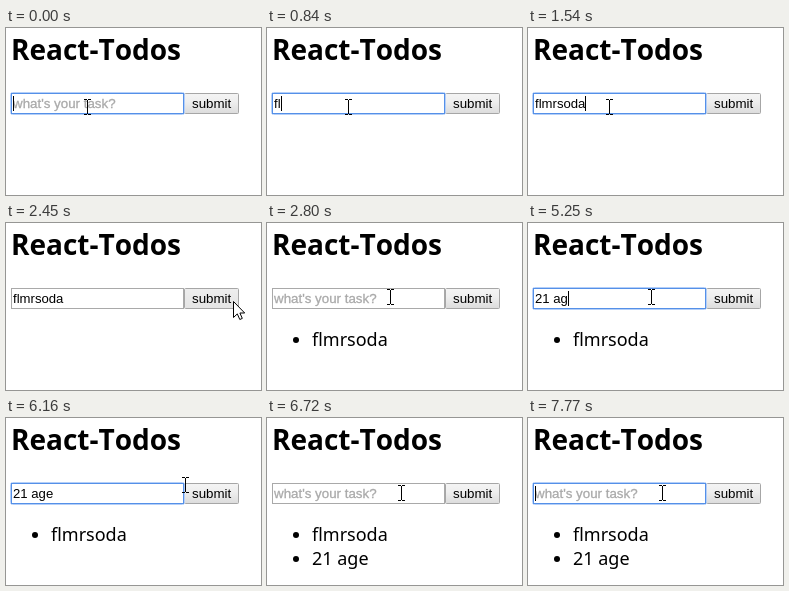
Write an HTML page that moves like this. It is 255x167 px and loops after 8 s.

```html
<!DOCTYPE html>
<html lang="en">
<head>
<meta charset="utf-8">
<title>React-Todos</title>
<style>
  html, body { margin: 0; height: 100%; overflow: hidden; background: #fff; }
  svg { display: block; width: 255px; height: 167px; }
  text { white-space: pre; }
  .ui { font-family: "Liberation Sans", Arial, sans-serif; font-size: 13.333px; }
  .typed { font-size: 13.15px; }
  .hint { fill: #a9a9a9; stroke: #a9a9a9; stroke-width: .3px; }
  .page { font-family: "Noto Sans", "Open Sans", sans-serif; font-size: 18px; }
  .title { font-size: 28px; font-weight: 700; font-kerning: none; }
</style>
</head>
<body>
<svg viewBox="0 0 255 167">
  <defs>
    <linearGradient id="face" x2="0" y2="1">
      <stop offset="0" stop-color="#f4f4f4"/>
      <stop offset=".4" stop-color="#efefef"/>
      <stop offset="1" stop-color="#dcdcdc"/>
    </linearGradient>
    <linearGradient id="faceDown" x2="0" y2="1">
      <stop offset="0" stop-color="#eeeeee"/>
      <stop offset="1" stop-color="#e4e4e4"/>
    </linearGradient>
  </defs>
  <rect width="255" height="167" fill="#fff"/>
  <text class="page title" x="5" y="32">React-Todos</text>

  <rect id="button" x="178.5" y="65.5" width="54" height="20" rx="1" stroke="#a6a6a6"/>
  <text class="ui" x="186" y="80">submit</text>

  <rect x="5.5" y="65.5" width="172" height="20" fill="#fff" stroke="#a9a9a9"/>
  <g id="ring" fill="none">
    <rect x="4.5" y="64.5" width="174" height="22" rx="2" stroke="#b4cff8"/>
    <rect x="5.5" y="65.5" width="172" height="20" stroke="#5590e8"/>
  </g>
  <text id="hint" class="ui hint" x="7" y="80">what's your task?</text>
  <text id="typed" class="ui typed" x="7" y="80"></text>
  <rect id="caret" y="68" width="1" height="15"/>

  <g id="items" class="page"></g>

  <path id="beam" d="M-3 -7.5H0M1 -7.5H4M.5 -7V7M-3 7.5H0M1 7.5H4" fill="none" stroke="#000"/>
  <path id="arrow" d="M.5 .5V16.5L4.3 12.9L6.8 18.5L9.3 17.4L6.9 12H11.7Z" fill="#fff" stroke="#000"/>
</svg>
<script>
const LOOP = 8000, STEP = 70, BLINK = 490, APPROACH = 490;
const $ = id => document.getElementById(id);
const show = (el, on) => el.setAttribute('visibility', on ? 'visible' : 'hidden');

// Each round: click the field, type, click the button.
const rounds = [
  { text: 'flmrsoda', focus: -280, firstKey: 700, lastKey: 1540, blur: 2450, submit: 2520,
    field: { x: 81, y: 79 }, button: { x: 227, y: 78 } },
  { text: '21 age', focus: 2870, firstKey: 4130, lastKey: 5530, blur: 6370, submit: 6510,
    field: { x: 123, y: 74 }, button: { x: 214, y: 72 } },
  { text: '', focus: 6790, blur: Infinity, submit: Infinity, field: { x: 134, y: 75 } }
];

// Eased move from a to b along an upward arc
function glide(a, b, progress, lift) {
  const p = Math.min(1, Math.max(0, progress));
  const k = (1 - Math.cos(Math.PI * p)) / 2;
  return {
    x: Math.round(a.x + (b.x - a.x) * k),
    y: Math.round(a.y + (b.y - a.y) * k - lift * Math.sin(Math.PI * k))
  };
}

function pointerAt(t, index) {
  const round = rounds[index], before = rounds[index - 1];
  const arrival = round.focus - STEP;
  if (before && t < arrival) {
    const progress = (t - before.submit) / (arrival - before.submit);
    return glide(before.button, round.field, progress, 25);
  }
  if (!round.button) return round.field;
  return glide(round.field, round.button, 1 - (round.blur - t) / APPROACH, 6);
}

function typedCount({ text, firstKey, lastKey }, t) {
  if (!text || t < firstKey) return 0;
  const interval = (lastKey - firstKey) / (text.length - 1);
  return Math.min(text.length, 1 + Math.floor((t - firstKey) / interval));
}

function caretOn(round, count, t) {
  const interval = (round.lastKey - round.firstKey) / (round.text.length - 1);
  const reset = count ? round.firstKey + (count - 1) * interval : round.focus;
  return Math.floor((t - reset) / BLINK) % 2 === 0;
}

const svgEl = (name, attrs, parent) => {
  const el = document.createElementNS('http://www.w3.org/2000/svg', name);
  for (const key in attrs) el.setAttribute(key, attrs[key]);
  return parent.appendChild(el);
};

const items = rounds.filter(r => r.text).map((round, i) => {
  const row = svgEl('g', { transform: `translate(0 ${24 * i})` }, $('items'));
  svgEl('circle', { cx: 29, cy: 117, r: 3 }, row);
  svgEl('text', { x: 45, y: 123 }, row).textContent = round.text;
  return row;
});

function draw(time) {
  const t = Math.floor(time / STEP) * STEP;
  const index = rounds.findIndex(r => t < r.submit);
  const round = rounds[index];
  const count = typedCount(round, t);
  const focused = t >= round.focus && t < round.blur;

  $('typed').textContent = round.text.slice(0, count);
  show($('hint'), !count);
  show($('ring'), focused);
  items.forEach((row, i) => show(row, i < index));

  show($('caret'), focused && caretOn(round, count, t));
  $('caret').setAttribute('x', Math.round(7 + (count && $('typed').getComputedTextLength())));

  const { x, y } = pointerAt(t, index);
  const overField = x <= 179 && y >= 64 && y <= 86;
  show($('beam'), overField);
  show($('arrow'), !overField);
  $(overField ? 'beam' : 'arrow').setAttribute('transform', `translate(${x} ${y})`);
  $('button').setAttribute('fill', t >= round.blur ? 'url(#faceDown)' : 'url(#face)');
}

const start = performance.now();
(function tick() {
  draw((performance.now() - start) % LOOP);
  requestAnimationFrame(tick);
})();
</script>
</body>
</html>
```
